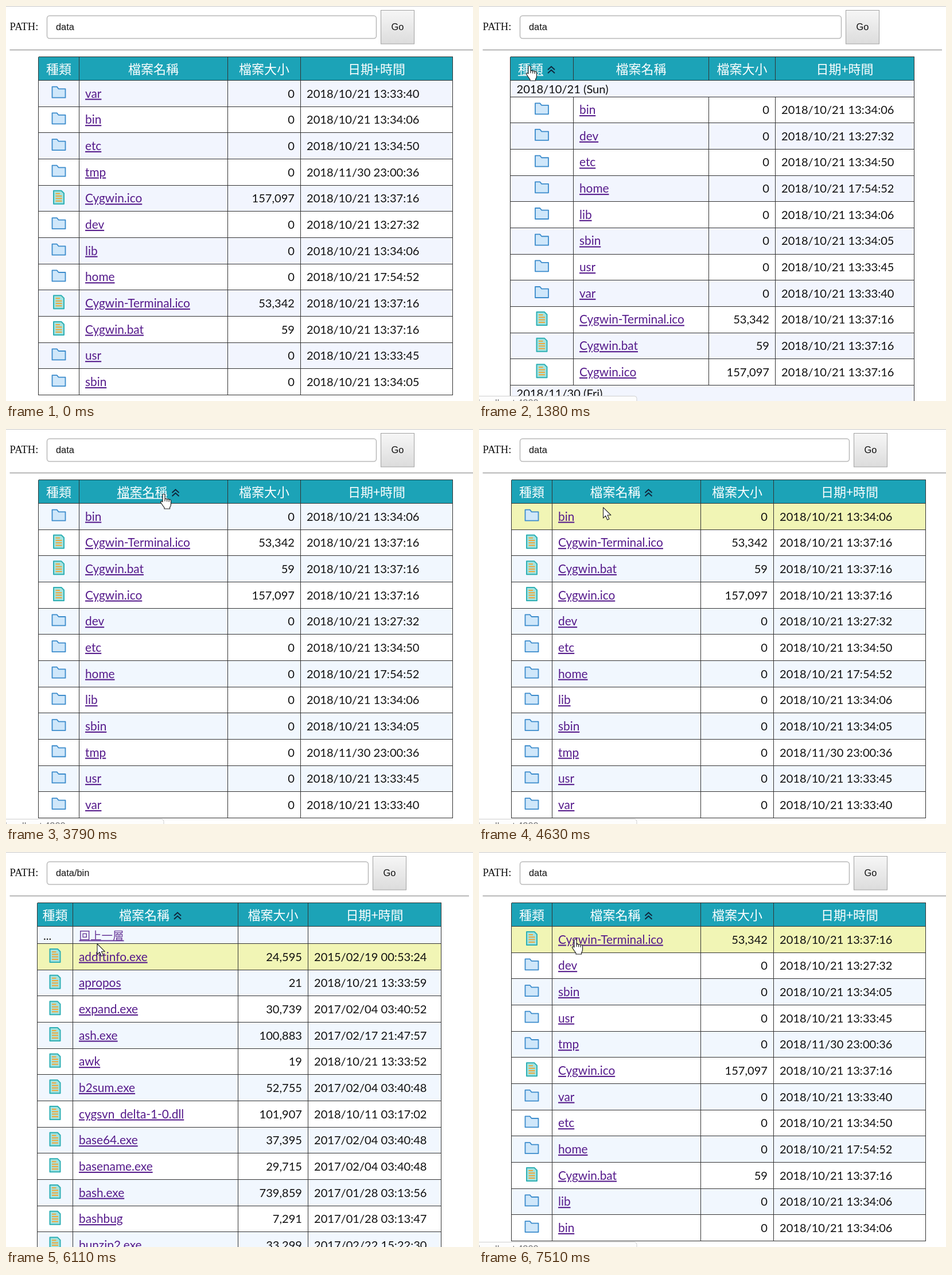
These frames come from a looping animation (814x688 px, 8 s). An HTML page:

```html
<!DOCTYPE html>
<html lang="zh-Hant">
<head>
<meta charset="utf-8">
<style>
  html, body { margin: 0; width: 100%; height: 100%; overflow: hidden; background: #fff; }
  svg { display: block; width: 814px; height: 688px; }
  .cell { font: 20.1px Lato, "Open Sans", sans-serif; fill: #111; }
  .link { font-size: 20.8px; fill: #551a8b; text-decoration: underline; text-decoration-thickness: 1.3px; text-underline-offset: 2px; }
  .up { font: 300 19.5px "Noto Sans CJK TC", "Noto Sans CJK", sans-serif; fill: #6a3a9a; }
  .head { font: 500 22px "Noto Sans CJK TC", "Noto Sans CJK", sans-serif; fill: #fff; text-anchor: middle; }
  .label { font: 18.6px "Liberation Serif", serif; fill: #111; }
  .field { font: 16.4px "Liberation Sans", sans-serif; fill: #111; }
  .end { text-anchor: end; }
  .grid { fill: none; stroke: #333; stroke-width: 1; shape-rendering: crispEdges; }
</style>
</head>
<body>
<svg id="stage" viewBox="0 0 814 688">
  <defs>
    <linearGradient id="button" x2="0" y2="1">
      <stop stop-color="#f6f6f6"/><stop offset="1" stop-color="#dcdcdc"/>
    </linearGradient>
    <path id="folder" d="M-11.5 1.2h8.2l3 3.6h11.8v15.4h-23z" fill="#cfe7fa" stroke="#3c8ccc" stroke-width="1.8" stroke-linejoin="round"/>
    <g id="file">
      <path d="M-9 0h13.5l4.5 4.5v18.5h-18z" fill="#a5e3df" stroke="#2fb0b5" stroke-width="2" stroke-linejoin="round"/>
      <path d="M-5.5 5h7.5M-5.5 9.3h11M-5.5 13.6h11M-5.5 18h11" stroke="#f2a73b" stroke-width="2"/>
    </g>
    <path id="chevrons" d="M-6 0l6-5.5 6 5.5M-6 6l6-5.5 6 5.5" fill="none" stroke="#10243a" stroke-width="1.9"/>
  </defs>
  <path d="M0 .5H814" stroke="#c8c8c8"/>
  <text class="label" x="6.5" y="42">PATH:</text>
  <rect id="input" x="71.5" y="17" height="39.5" rx="4.5" fill="#fff" stroke="#b9b9b9" stroke-width="1.5"/>
  <text id="path" class="field" x="87" y="42"></text>
  <g id="go">
    <rect x=".5" y="7.5" width="58" height="58.5" fill="url(#button)" stroke="#a2a2a2"/>
    <text class="field" x="29.5" y="42" text-anchor="middle">Go</text>
  </g>
  <path id="rule" stroke="#a0a0a0" stroke-width="1.4"/>
  <g id="pages"></g>
  <g id="status">
    <path d="M-1 679.5H271q4 0 4 4V690H-1z" fill="#fdfdfd" stroke="#cfcfcf"/>
    <text class="field" x="-2" y="697" style="fill:#777">localhost:4200</text>
  </g>
  <path id="arrow" d="M0 0V18.5l4.2-4 3 7 3.2-1.4-3-6.8h6z" fill="#fff" stroke="#222" stroke-width="1.1" stroke-linejoin="round"/>
  <path id="hand" d="M-2 1.5q2-3 4 0v7.5q2-1.6 3.6.3 2-1.2 3.5.8 3-1 3.4 2v6q0 3-2 5.5v2.4h-9.5v-2q-3.5-4.5-6.5-9.5 0-3 3.5-.7zM2 9v4M5.6 9.5v4M9.1 10.5v3.5" fill="#fff" stroke="#222" stroke-width="1.2" stroke-linejoin="round"/>
</svg>
<script>
const NS = "http://www.w3.org/2000/svg";
const LOOP = 8000, HEAD_TOP = 88.5, TOP = 129.5, ROW = 45.67, GROUP = 28.6, UP = 30;
const TITLES = ["種類", "檔案名稱", "檔案大小", "日期+時間"];
const byId = id => document.getElementById(id);
const snap = y => Math.floor(y) + 0.5;

function add(parent, tag, attrs, text) {
  const node = document.createElementNS(NS, tag);
  for (const key in attrs) node.setAttribute(key, attrs[key]);
  if (text !== undefined) node.textContent = text;
  return parent.appendChild(node);
}

const today = "2018/10/21 ";
const root = {
  var: ["0", today + "13:33:40"], bin: ["0", today + "13:34:06"],
  etc: ["0", today + "13:34:50"], tmp: ["0", "2018/11/30 23:00:36"],
  "Cygwin.ico": ["157,097", today + "13:37:16"], dev: ["0", today + "13:27:32"],
  lib: ["0", today + "13:34:06"], home: ["0", today + "17:54:52"],
  "Cygwin-Terminal.ico": ["53,342", today + "13:37:16"], "Cygwin.bat": ["59", today + "13:37:16"],
  usr: ["0", today + "13:33:45"], sbin: ["0", today + "13:34:05"]
};
const entries = names => names.split(" ").map(name => ({
  name, size: root[name][0], date: root[name][1], icon: name.includes(".") ? "file" : "folder"
}));
const group = title => ({ title, height: GROUP });

const programs = `addftinfo.exe|24,595|2015/02/19 00:53:24
apropos|21|2018/10/21 13:33:59
expand.exe|30,739|2017/02/04 03:40:52
ash.exe|100,883|2017/02/17 21:47:57
awk|19|2018/10/21 13:33:52
b2sum.exe|52,755|2017/02/04 03:40:48
cygsvn_delta-1-0.dll|101,907|2018/10/11 03:17:02
base64.exe|37,395|2017/02/04 03:40:48
basename.exe|29,715|2017/02/04 03:40:48
bash.exe|739,859|2017/01/28 03:13:56
bashbug|7,291|2017/01/28 03:13:47
bunzip2.exe|33,299|2017/02/22 15:22:30`.split("\n").map(line => {
  const [name, size, date] = line.split("|");
  return { name, size, date, icon: "file" };
});

const oldest = entries("bin dev etc home lib sbin usr var Cygwin-Terminal.ico Cygwin.bat Cygwin.ico");
const october = group("2018/10/21 (Sun)"), november = group("2018/11/30 (Fri)");
const wide = [56.5, 127.5, 386.5, 513.5, 778.5];
const grouped = [54.5, 164.5, 400.5, 516.5, 758.5];

const pages = [
  { start: 0, cols: wide, sort: -1, rows: entries(Object.keys(root).join(" ")) },
  { start: 1280, cols: grouped, sort: 0, narrow: true, rows: [october, ...oldest, november] },
  { start: 1920, cols: grouped, sort: 0, down: true, narrow: true,
    rows: [november, ...entries("tmp"), october, ...oldest] },
  { start: 3690, cols: wide, sort: 1, stripe: "#f1f7fe",
    rows: entries("bin Cygwin-Terminal.ico Cygwin.bat Cygwin.ico dev etc home lib sbin tmp usr var") },
  { start: 5650, cols: [54.5, 116.5, 404.5, 526.5, 758.5], sort: 1, narrow: true, stripe: "#f1f7fe",
    rows: [{ up: true, height: UP }, ...programs] },
  { start: 7510, cols: wide, sort: 1, stripe: "#f1f7fe",
    rows: entries("Cygwin-Terminal.ico dev sbin usr tmp Cygwin.ico var etc home Cygwin.bat lib bin") }
];

function drawHeader(page) {
  const { cols, node } = page;
  add(node, "rect", { x: cols[0], y: HEAD_TOP, width: cols[4] - cols[0], height: TOP - HEAD_TOP, fill: "#1ca3b7" });
  page.titles = TITLES.map((title, i) => {
    const sorted = i === page.sort;
    const x = (cols[i] + cols[i + 1]) / 2 - (sorted ? 19.5 : 0);
    const half = title.length * 11;
    add(node, "text", { class: "head", x, y: 118 }, title);
    if (sorted) add(node, "use", { href: "#chevrons",
      transform: `translate(${x + half + 14} 111) scale(1 ${page.down ? -1 : 1})` });
    return add(node, "path", { d: `M${x - half} 121h${half * 2}`, stroke: "#fff", "stroke-width": 1.6 });
  });
}

function drawRow(page, row, index, y) {
  const { cols, node } = page, height = row.height || ROW;
  const fill = index % 2 ? "#fff" : page.stripe || "#f2f5fe";
  const top = snap(y), bottom = snap(y + height);
  const rect = add(node, "rect", { x: cols[0], y: top, width: cols[4] - cols[0], height: bottom - top });
  const text = (x, dy, cls, value) => add(node, "text", { x, y: y + dy, class: "cell " + cls }, value);
  if (row.title) text(cols[0] + 11, 22, "", row.title);
  else if (row.up) {
    text(cols[0] + 10.5, 23, "", "...");
    text(cols[1] + 11, 23, "link up", "回上一層");
  } else {
    add(node, "use", { href: "#" + row.icon, x: (cols[0] + cols[1]) / 2, y: y + (row.icon === "file" ? 9.5 : 10) });
    text(cols[1] + 10.5, 30, "link", row.name);
    text(cols[3] - 10.5, 30, "end", row.size);
    text(cols[3] + 10.5, 30, "", row.date);
  }
  const sides = row.title ? [cols[0], cols[4]] : cols;
  const lines = sides.map(x => `M${x} ${top}V${bottom}`).join("") + `M${cols[0]} ${bottom}H${cols[4]}`;
  return { rect, fill, y, height, lines };
}

for (const page of pages) {
  const { cols } = page;
  page.node = add(byId("pages"), "g");
  drawHeader(page);
  let y = TOP;
  page.cells = page.rows.map((row, i) => {
    const cell = drawRow(page, row, i, y);
    y += cell.height;
    return cell;
  });
  const header = cols.map(x => `M${x} ${HEAD_TOP}V${TOP}`).join("")
    + `M${cols[0]} ${HEAD_TOP}H${cols[4]}M${cols[0]} ${TOP}H${cols[4]}`;
  add(page.node, "path", { class: "grid", d: header + page.cells.map(cell => cell.lines).join("") });
}

// Pointer stops: time, x, y.
const stops = [
  [360, 11, 655], [1100, 88, 104], [3049, 88, 104], [3050, 91, 105], [3230, 266, 120],
  [3410, 266, 120], [3510, 275, 113], [4450, 275, 113], [4810, 159, 160],
  [6190, 159, 160], [6390, 168, 152], [LOOP, 168, 152]
];

function pointerAt(t) {
  const i = Math.max(1, stops.findIndex(stop => stop[0] > t));
  const [t0, x0, y0] = stops[i - 1], [t1, x1, y1] = stops[i];
  const p = Math.min(1, Math.max(0, (t - t0) / (t1 - t0)));
  const e = p * p * (3 - 2 * p);
  return { x: x0 + (x1 - x0) * e, y: y0 + (y1 - y0) * e };
}

const within = (t, from, to) => t >= from && t < to;
const show = (node, on) => node.setAttribute("display", on ? "inline" : "none");

function render(t) {
  const page = pages.findLast(item => t >= item.start);
  const { x, y } = pointerAt(t), { cols } = page;
  const visible = t >= 360;
  const inTable = visible && x > cols[0] && x < cols[4];
  for (const item of pages) show(item.node, item === page);

  const settling = within(t, 5650, 5930);
  for (const cell of page.cells) {
    const hovered = inTable && !settling && y >= cell.y && y < cell.y + cell.height;
    cell.rect.setAttribute("fill", hovered ? "#f1f5b5" : cell.fill);
  }
  const inHeader = inTable && y > 98 && y < 124;
  const overTitle = page.titles.map((line, i) => {
    const over = inHeader && x > cols[i] + 10 && x < cols[i + 1] - 10;
    show(line, over);
    return over;
  }).includes(true);

  const overLink = within(t, 4750, 5550) || t >= 6290;
  const hand = overTitle || overLink;
  for (const [id, on] of [["hand", hand], ["arrow", !hand]]) {
    show(byId(id), visible && on);
    byId(id).setAttribute("transform", `translate(${x} ${y})`);
  }
  show(byId("status"), within(t, 1180, 5930) || t >= 6390);

  byId("path").textContent = within(t, 5170, 7040) ? "data/bin" : "data";
  byId("input").setAttribute("width", page.narrow ? 560 : 574);
  byId("go").setAttribute("transform", `translate(${page.narrow ? 639 : 653} 0)`);
  byId("rule").setAttribute("d", `M6.5 76.5H${page.narrow ? 807 : 814}`);
}

const begin = performance.now();
function tick() {
  render((performance.now() - begin) % LOOP);
  requestAnimationFrame(tick);
}
tick();
</script>
</body>
</html>
```
